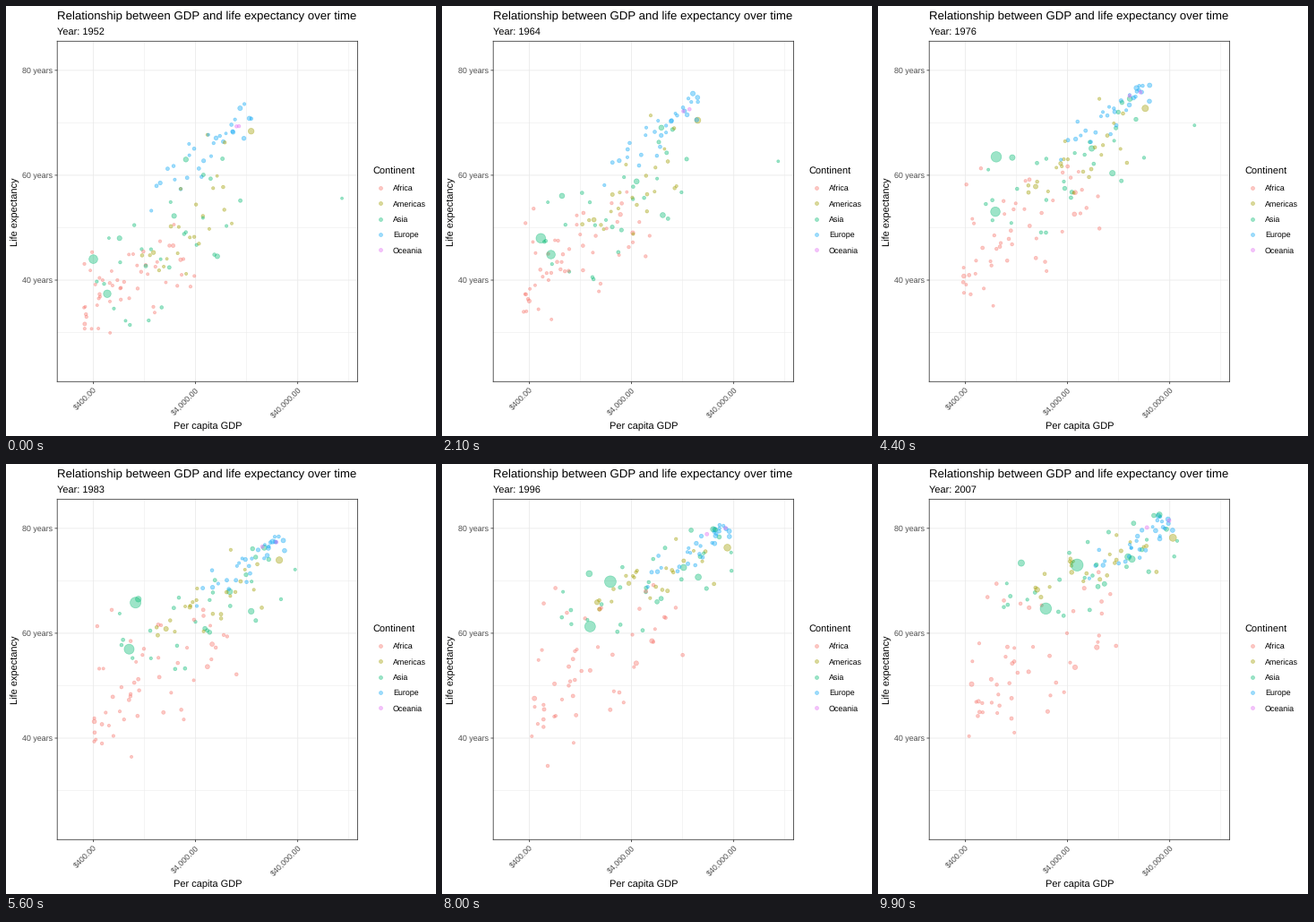
A matplotlib script that plays this animation: 480 by 480 pixels, repeating every 10 s.

```python
import numpy as np
import matplotlib.pyplot as plt
from matplotlib.animation import FuncAnimation
from matplotlib.colors import to_rgba

SIZE, DPI = 480, 72
FRAMES, INTERVAL = 100, 100
FIRST, LAST = 1952, 2007
SURVEYS = np.arange(FIRST, LAST + 1, 5)
T = np.linspace(0, 1, len(SURVEYS))

LEFT, RIGHT, TOP, BOTTOM = 57.2, 392.6, 39.3, 419.3
X_LIM, Y_LIM = (2.2487, 5.1887), (20.649, 85.553)
INK, GREY, GRID = "#333333", "#4D4D4D", "#EBEBEB"
COLORS = {"Africa": "#F8766D", "Americas": "#A3A108", "Asia": "#0CBC77",
          "Europe": "#10A9F6", "Oceania": "#E26BF3"}
ALPHA = 0.4

plt.rcParams.update({"font.family": "Liberation Sans", "text.hinting": "none"})
rng = np.random.default_rng(12)

# Landmark dots: population in millions at both ends and a few turning points.
LANDMARKS = [
    ("Asia", (556, 1319), [(1952, 400, 44), (1962, 488, 44.5), (1970, 650, 61.2),
                           (1982, 962, 65.5), (2007, 4959, 73)]),
    ("Asia", (372, 1110), [(1952, 547, 37.4), (1982, 855, 56.6), (2007, 2452, 64.7)]),
    ("Asia", (86, 127), [(1952, 3217, 63), (1972, 14779, 73.4), (2007, 31656, 82.6)]),
    ("Asia", (0.2, 2.5), [(1952, 108382, 55.6), (1972, 109348, 67.7),
                          (1985, 29500, 73), (2007, 47307, 77.6)]),
    ("Americas", (158, 301), [(1952, 13990, 68.4), (2007, 42952, 78.2)]),
    ("Africa", (2.5, 9), [(1952, 493, 40), (1987, 848, 44), (1992, 737, 23.6),
                          (1997, 590, 36.1), (2007, 863, 46.2)]),
]

# Crowds: each pair runs from the first to the last survey.
CROWDS = {
    "Africa": dict(count=51, skew=1.5, pace=1.8, poor=(2.5, 2.62), rich=(3.6, 4.1),
                   life=(39.5, 55), gain=(6, 13), scatter=(4.3, 7), people=(3, 10)),
    "Americas": dict(count=24, skew=0.8, pace=1.4, poor=(3.05, 3.2), rich=(3.95, 4.35),
                     life=(53, 73.5), gain=(20, 10), scatter=(5.5, 2.3), people=(4, 10)),
    "Asia": dict(count=29, skew=1, pace=1.4, poor=(2.6, 2.95), rich=(4, 4.65),
                 life=(46.5, 71), gain=(20, 17), scatter=(6, 3.8), people=(8, 24)),
    "Europe": dict(count=30, skew=0.7, pace=1.5, poor=(3.1, 3.8), rich=(4.15, 4.66),
                   life=(64.5, 77.7), gain=(15, 10), scatter=(2.5, 1.2), people=(9, 12)),
    "Oceania": dict(count=2, skew=1, pace=1.3, poor=(3.99, 4.35), rich=(4.04, 4.6),
                    life=(69.3, 80.7), gain=(0, 2), scatter=(0.1, 0.3), people=(4, 10)),
}


def blend(pair, t):
    return pair[0] + (pair[1] - pair[0]) * t


def landmark(people, knots):
    years, gdp, life = np.array(knots, float).T
    return (np.interp(SURVEYS, years, np.log10(gdp)),
            np.interp(SURVEYS, years, life), blend(people, T))


def crowd(count, skew, pace, poor, rich, life, gain, scatter, people):
    """Dots ranked by wealth, with fast early progress and slowly changing health."""
    e = 1 - (1 - T) ** pace
    rank = (((np.arange(count) + 0.5) / count) ** skew)[:, None]
    drift = rng.normal(0, 0.1, (count, 1)) * T
    wobble = rng.normal(0, 0.02, (count, len(T)))
    low, high = blend(poor, e), blend(rich, e)
    x = low + (high - low) * np.abs(rank + drift + wobble)

    a, b = np.clip(rng.normal(size=(2, count, 1)), -2, 2)
    health = np.cos(T) * a + np.sin(T) * b
    y = (blend(life, e) + blend(gain, e) * (rank - rank.mean())
         + blend(scatter, e) * health)
    cap = blend((74, 82.5), T)
    y = cap - np.abs(cap - y)

    pop = blend(people, T) * np.minimum(np.exp(rng.normal(0, 1, (count, 1))), 9)
    return x, y, pop


groups = [(name, landmark(people, knots)) for name, people, knots in LANDMARKS]
groups += [(name, crowd(**spec)) for name, spec in CROWDS.items()]
X, Y, POP = (np.vstack([g[k] for _, g in groups]) for k in range(3))
names = np.concatenate([[n] * len(np.atleast_2d(g[0])) for n, g in groups])

order = rng.permutation(len(names))
X, Y, POP = X[order], Y[order], POP[order]
FILL = [to_rgba(COLORS[n], ALPHA) for n in names[order]]


def area(pop):
    return (2 * (1.42 + 5.33 * np.sqrt(pop / 1319))) ** 2


def state(i):
    """Positions and dot areas, blended linearly between surveys."""
    k, f = divmod(i / (FRAMES - 1) * (len(SURVEYS) - 1), 1)
    k = int(k)
    nxt = min(k + 1, len(SURVEYS) - 1)
    x, y, pop = (m[:, k] * (1 - f) + m[:, nxt] * f for m in (X, Y, POP))
    return np.column_stack([x, y]), area(pop)


fig = plt.figure(figsize=(SIZE / DPI, SIZE / DPI), dpi=DPI, facecolor="white")


def text(x, y, s, size=8.85, color="black", **kw):
    return fig.text(x / SIZE, 1 - y / SIZE, s, fontsize=size, color=color,
                    va="baseline", rotation_mode="anchor", **kw)


def px(v):
    return LEFT + (v - X_LIM[0]) / (X_LIM[1] - X_LIM[0]) * (RIGHT - LEFT)


def py(v):
    return BOTTOM - (v - Y_LIM[0]) / (Y_LIM[1] - Y_LIM[0]) * (BOTTOM - TOP)


ax = fig.add_axes([LEFT / SIZE, 1 - BOTTOM / SIZE,
                   (RIGHT - LEFT) / SIZE, (BOTTOM - TOP) / SIZE])
ax.set(xlim=X_LIM, ylim=Y_LIM, xticks=[], yticks=[])
for spine in ax.spines.values():
    spine.set(color=INK, linewidth=0.8, snap=False)

# Page-wide axes in pixels for ticks and legend.
page = fig.add_axes([0, 0, 1, 1], facecolor="none")
page.set(xlim=(0, SIZE), ylim=(SIZE, 0))
page.axis("off")


def tick(xs, ys):
    page.plot(xs, ys, color=INK, lw=0.8, snap=False, solid_capstyle="butt")


for amount in (400, 4000, 40000):
    v = np.log10(amount)
    ax.axvline(v, color=GRID, lw=0.9, zorder=0, snap=False)
    ax.axvline(v + 0.5, color=GRID, lw=0.5, zorder=0, snap=False)
    tick([px(v)] * 2, [BOTTOM, BOTTOM + 2.75])
    text(px(v) + 4.7, 428.8, rf"\${amount:,.2f}", color=GREY, ha="right", rotation=45)
for v in (40, 60, 80):
    ax.axhline(v, color=GRID, lw=0.9, zorder=0, snap=False)
    ax.axhline(v - 10, color=GRID, lw=0.5, zorder=0, snap=False)
    tick([LEFT - 2.75, LEFT], [py(v)] * 2)
    text(52.3, py(v) + 3.2, f"{v} years", color=GREY, ha="right")

text(57, 15, "Relationship between GDP and life expectancy over time", 13.28)
year_label = text(57, 32, "", 11.05)
text(225, 473, "Per capita GDP", 11.05, ha="center")
text(13.8, 229.3, "Life expectancy", 11.05, ha="center", rotation=90)

text(409.3, 188, "Continent", 11.05)
for row, (name, color) in enumerate(COLORS.items()):
    y = 203.1 + 17.28 * row
    rgba = [to_rgba(color, ALPHA)]
    page.scatter([418], [y], s=16, facecolor=rgba, edgecolor=rgba, linewidth=0.71)
    text(432, y + 3.2, name)

points, areas = state(0)
cloud = ax.scatter(*points.T, s=areas, facecolors=FILL, edgecolors=FILL,
                   linewidths=0.71, zorder=2)


def draw(i):
    points, areas = state(i)
    cloud.set_offsets(points)
    cloud.set_sizes(areas)
    year = FIRST + (LAST - FIRST) * i / (FRAMES - 1)
    year_label.set_text(f"Year: {round(year)}")
    return cloud, year_label


anim = FuncAnimation(fig, draw, frames=FRAMES, interval=INTERVAL,
                     repeat=True, repeat_delay=0, blit=False)
plt.show()
```
